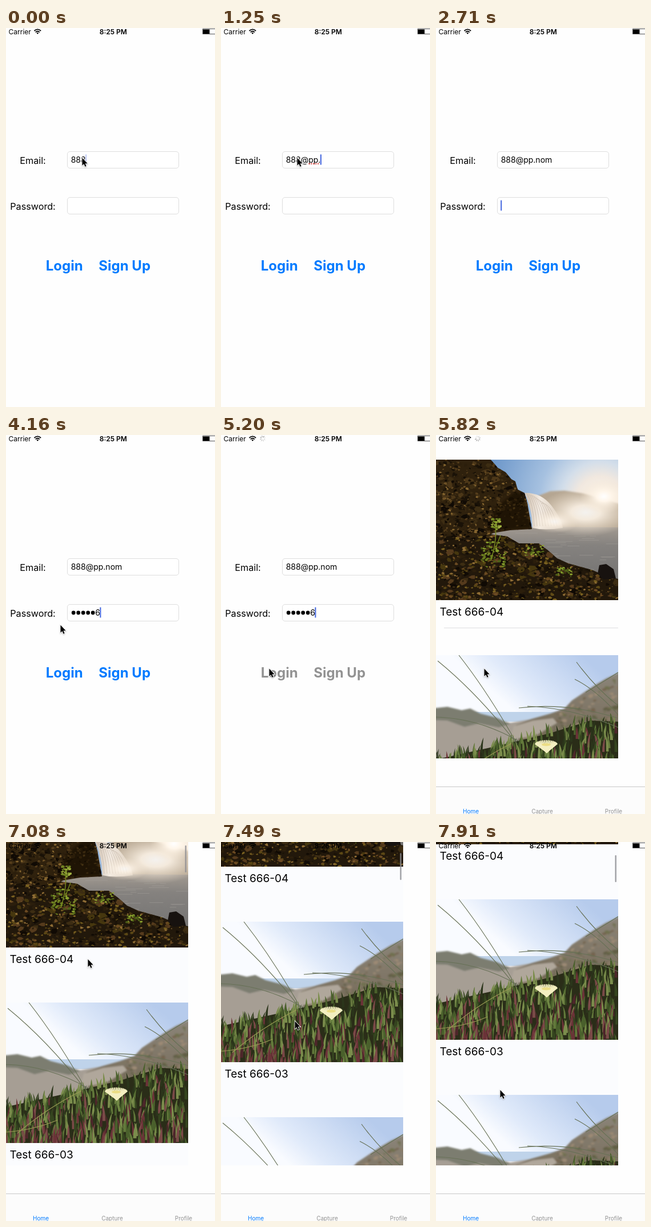
An HTML page for the animation above (8000 ms loop, 366 by 661 pixels).

```html
<!DOCTYPE html>
<html lang="en">
<head>
<meta charset="utf-8">
<title>Login and photo feed</title>
<style>
html, body { margin: 0; height: 100%; overflow: hidden; background: #fefefe; }
svg { display: block; width: 100vw; height: 100vh; font-family: Inter, Roboto, sans-serif; }
.mid { text-anchor: middle; }
.label { font-size: 16.2px; }
.input { font-size: 14px; }
.box { fill: #fff; stroke: #dedede; }
.button { font-size: 24px; font-weight: 700; }
.title { font-size: 19px; }
.tab { font-size: 10px; fill: #929292; }
.caret { fill: #4366df; }
#mouse { filter: drop-shadow(0 1px 1px #0004); }
</style>
</head>
<body>
<svg viewBox="0 0 366 661" preserveAspectRatio="none">
  <defs>
    <radialGradient id="sky1" gradientUnits="userSpaceOnUse" cx="288" cy="72" r="215">
      <stop stop-color="#fff8ee"/><stop offset=".2" stop-color="#f1e8df"/><stop offset=".32" stop-color="#d3deea"/>
      <stop offset=".5" stop-color="#a6c1e0"/><stop offset="1" stop-color="#6390c6"/>
    </radialGradient>
    <linearGradient id="water" x2="0" y2="1">
      <stop stop-color="#a29a91"/><stop offset=".25" stop-color="#85827f"/><stop offset="1" stop-color="#6b6b6b"/>
    </linearGradient>
    <linearGradient id="fall" x2="1" y2="0">
      <stop stop-color="#cfc0b0"/><stop offset=".4" stop-color="#f3ebe2"/><stop offset="1" stop-color="#e9dccd" stop-opacity=".6"/>
    </linearGradient>
    <radialGradient id="sun">
      <stop stop-color="#fff"/><stop offset=".3" stop-color="#fff6ea"/><stop offset="1" stop-color="#f3e4d0" stop-opacity="0"/>
    </radialGradient>
    <linearGradient id="sky2" x1=".32" y1=".42" x2=".8" y2="0">
      <stop offset=".15" stop-color="#f9fbff"/><stop offset=".4" stop-color="#e0eafa"/><stop offset="1" stop-color="#b6cbec"/>
    </linearGradient>
    <linearGradient id="hill" x2="0" y2="1">
      <stop stop-color="#8b8579"/><stop offset=".5" stop-color="#7d7363"/><stop offset="1" stop-color="#5e5a40"/>
    </linearGradient>
    <filter id="soft"><feGaussianBlur stdDeviation="1.8"/></filter>
    <clipPath id="frame"><path d="M0 0H319V245H0Z"/></clipPath>
    <clipPath id="cliffClip"><path id="cliffShape" d="M0 0H96L108 14 122 22 132 34 139 38 143 52 155 58 160 76 168 121 130 123 100 128 60 150 0 150Z"/></clipPath>
    <clipPath id="shoreClip"><path id="shoreShape" d="M0 138 30 132 60 137 95 130 125 134 145 146 180 146 196 158 212 172 232 181 250 186 275 193 300 204 319 208V245H0Z"/></clipPath>
    <clipPath id="listClip"><path d="M0 0H319V564H0Z"/></clipPath>

    <g id="fallsPhoto" clip-path="url(#frame)">
      <path fill="url(#sky1)" d="M0 0H319V245H0Z"/>
      <path fill="#b5a692" filter="url(#soft)" d="M176 64 200 55 225 54 258 59 325 78V120H176Z"/>
      <path fill="url(#water)" d="M90 122 200 117 319 118V245H90Z"/>
      <ellipse cx="262" cy="92" rx="85" ry="42" fill="url(#sun)" opacity=".85"/>
      <ellipse cx="294" cy="64" rx="42" ry="30" fill="url(#sun)"/>
      <use href="#cliffShape" fill="#2f210d"/>
      <g id="cliff" clip-path="url(#cliffClip)"></g>
      <path fill="#130d06" opacity=".6" filter="url(#soft)" d="M104 84 138 56 154 62 166 119 90 124Z"/>
      <path fill="url(#fall)" d="M155 58Q184 57 202 80T222 119Q190 124 169 119 168 84 155 58Z"/>
      <g id="streams" fill="none" stroke="#b5a697" opacity=".5"></g>
      <ellipse cx="208" cy="108" rx="42" ry="20" fill="url(#sun)" opacity=".75"/>
      <g id="ripples" stroke="#a5a19b" opacity=".5"></g>
      <use href="#shoreShape" fill="#22180b"/>
      <g id="shore" clip-path="url(#shoreClip)"></g>
      <path fill="#17120f" d="M283 199 286 184 298 182 311 191 315 207 293 209Z"/>
      <g id="plants"></g>
      <path stroke="#75861f" stroke-width="1.5" fill="none" d="M104 117Q107 140 96 176M113 132 104 155"/>
    </g>

    <g id="dunePhoto" clip-path="url(#frame)">
      <path fill="url(#sky2)" d="M0 0H319V245H0Z"/>
      <path fill="#bfd3ea" d="M60 99H210V116H60Z"/>
      <g filter="url(#soft)">
        <path fill="#a69e94" d="M-9 106 60 102 130 118 210 104V200H-9Z"/>
        <path fill="#7b7d70" d="M-9 93 20 90 45 96 60 93 78 102 106 109 130 120 110 126 75 119 50 125 20 114-9 113Z"/>
        <path fill="url(#hill)" d="M328 27 297 41 280 51 256 67 238 79 225 93 200 102 168 111 140 122 150 190H328Z"/>
        <g id="scrub"></g>
        <path fill="#b0a79b" d="M136 124 170 114 205 110 212 118 175 140 130 148Z"/>
      </g>
      <path fill="#2a2d18" d="M0 182 100 160 200 136 270 114 319 116V245H0Z"/>
      <g id="leaves"></g>
      <g fill="none" stroke="#667055" stroke-width="1.1">
        <path d="M3 10Q72 66 138 150M40 0Q92 66 142 155M0 108Q75 110 145 150M145 92Q230 82 319 110M160 89Q240 92 319 126M246 12Q280 58 319 88M243 42Q280 60 319 104M262 65 319 30"/>
        <path stroke="#9c9a55" d="M20 228Q70 185 132 154M0 226Q50 222 90 205"/>
      </g>
      <path stroke="#6f8744" stroke-width="4" d="M194 169 199 190"/>
      <g id="flower" stroke="#f4efc1" stroke-width="2.4" stroke-linecap="round"></g>
      <ellipse cx="193" cy="156" rx="8" ry="2.5" fill="#ebdd85"/>
    </g>
  </defs>

  <path fill="#fefefe" d="M0 0H366V661H0Z"/>

  <g id="login">
    <text class="label mid" x="47" y="236.5">Email:</text>
    <text class="label mid" x="47" y="316.5">Password:</text>
    <rect class="box" x="107.5" y="215.5" width="195" height="29" rx="4.5"/>
    <rect class="box" x="107.5" y="295.5" width="195" height="29" rx="4.5"/>
    <text class="input" id="email" x="113.7" y="235"></text>
    <path id="typo" d="M154.5 236.8H171" stroke="#e2504c" stroke-width="2.4" stroke-linecap="round" stroke-dasharray="0 3.9"/>
    <g id="dots"></g>
    <text class="input" id="digit" y="315">6</text>
    <rect class="caret" id="caret" width="2" height="18"/>
    <g id="buttons">
      <text class="button mid" id="loginButton" x="102.2" y="423">Login</text>
      <text class="button mid" x="207.7" y="423">Sign Up</text>
    </g>
  </g>

  <g id="home">
    <path fill="#fefefe" d="M0 0H366V661H0Z"/>
    <g clip-path="url(#listClip)">
      <path id="tint" fill="#fbfcfe" d="M0 0H319V564H0Z"/>
      <g id="list"></g>
      <rect id="thumb" x="313.5" width="2.5" height="47" rx="1.2" fill="#8d8d92" opacity=".8"/>
    </g>
    <path fill="#fcfcfc" d="M0 613H366V661H0Z"/>
    <path stroke="#c9c9c9" d="M0 613.5H366"/>
    <text class="tab mid" x="61" y="659.7" style="fill:#007aff">Home</text>
    <text class="tab mid" x="186" y="659.7">Capture</text>
    <text class="tab mid" x="311" y="659.7">Profile</text>
  </g>

  <g id="status">
    <text x="4.6" y="10.7" font-size="12">Carrier</text>
    <path fill="none" stroke="#000" stroke-width="1.7" d="M49.5 5Q55.3 -.2 61.1 5M51.7 7.3Q55.3 4.2 58.9 7.3"/>
    <path d="M53.3 8.7Q55.3 7.3 57.3 8.7L55.3 10.8Z"/>
    <g id="spinner" stroke="#777" stroke-width="1.1"></g>
    <text class="mid" x="187.8" y="10.7" font-size="12" font-weight="600">8:25 PM</text>
    <path fill="#fff" stroke="#555" d="M370 1.5H344.5V10.5H370"/>
    <path d="M345 2.5H356.5V10H345Z"/>
  </g>

  <path id="mouse" d="M.5 .5V13.8L3.5 11 5.5 15.8 7.6 14.9 5.6 10.2H9.7Z" stroke="#fff" stroke-width="1.6" paint-order="stroke"/>
</svg>
<script>
const $ = id => document.getElementById(id);
const show = (id, on) => $(id).style.display = on ? '' : 'none';
const move = (id, x, y) => $(id).setAttribute('transform', `translate(${x} ${y})`);

let seed = 41;
const rnd = (lo, hi) => lo + (hi - lo) * ((seed = seed * 16807 % 2147483647) / 2147483647);
const pick = list => list[Math.floor(rnd(0, list.length))];
const fill = (id, n, part) => $(id).innerHTML += Array.from({ length: n }, (_, i) => part(i)).join('');

// Irregular stone or tuft
function blob(x, y, r, color) {
  let d = '';
  for (let a = 0; a < 6; a++) {
    const q = r * rnd(.4, 1.3);
    d += `${a ? 'L' : 'M'}${(x + q * Math.cos(a * 1.05)).toFixed(1)} ${(y + q * .7 * Math.sin(a * 1.05)).toFixed(1)}`;
  }
  return `<path fill="${color}" d="${d}Z"/>`;
}
const scatter = (id, n, [x, y, w, h], [small, big], colors) =>
  fill(id, n, () => blob(rnd(x, x + w), rnd(y, y + h), rnd(small, big), pick(colors)));

const dark = ['#1a1207', '#100a04', '#2b1e0c', '#3d2d13'];
const greens = ['#6c8020', '#8aa02e', '#4c5d17'];
scatter('cliff', 220, [0, 0, 168, 145], [3, 8], [...dark, '#4c3718']);
scatter('cliff', 650, [0, 0, 168, 145], [1, 3.5], [...dark, '#553d1b', '#6e5126', '#85652f']);
scatter('shore', 240, [0, 132, 319, 113], [4, 9], [...dark, '#46370f', '#563b1d']);
scatter('shore', 800, [0, 132, 319, 113], [1, 4], [...dark, '#5c4815', '#6b4a22', '#7a6120', '#8f6d35']);
scatter('plants', 30, [97, 103, 17, 18], [1.5, 3.5], ['#8da232', '#6f8422', '#a5b544']);
scatter('plants', 70, [80, 142, 42, 45], [1.5, 3.5], greens);
scatter('plants', 30, [156, 150, 32, 17], [1.5, 3.5], greens);
scatter('plants', 30, [211, 188, 28, 16], [1.5, 3.5], greens);
fill('streams', 9, i => `<path d="M${160 + i * 3} ${60 + i * i * .25}Q${170 + i * 4} 75 ${172 + i * 5} 116"/>`);
fill('ripples', 34, () => `<path d="M${rnd(130, 300)} ${rnd(126, 195)}h${rnd(10, 40)}"/>`);

fill('scrub', 260, () => {
  const x = rnd(150, 322);
  return blob(x, rnd(130 - .62 * (x - 150) + 12, 165), rnd(2, 6), pick(['#70714f', '#8a7c68', '#9c8a74', '#615f45', '#75654f']));
});
fill('leaves', 620, i => {
  const near = i / 620, x = rnd(-5, 324), top = 188 - .24 * x, y = top + (272 - top) * near;
  const h = rnd(14, 28) + near * 10, w = rnd(1.3, 2.7) + near * .5, lean = rnd(-5, 6), mid = y - h * .6;
  const red = rnd(0, 1) < near * .45 + (x < 150 ? .08 : 0);
  const color = pick(red ? ['#6b3338', '#4d262a', '#7b4a48'] : ['#4a602c', '#63793b', '#35451f', '#7b8d4c', '#2b351b']);
  return `<path fill="${color}" d="M${x - w} ${y}Q${x - w} ${mid} ${x + lean} ${y - h}Q${x + w} ${mid} ${x + w} ${y}Z"/>`;
});
fill('flower', 17, i => {
  const a = Math.PI * (1.06 + i * .055);
  return `<path d="M194 169L${193 + 19 * Math.cos(a)} ${156 + 7 * Math.sin(a)}"/>`;
});

fill('list', 3, i => `<g transform="translate(0 ${43 + 341 * i})">
  <use href="#${i ? 'dunePhoto' : 'fallsPhoto'}"/>
  <text class="title" x="6.5" y="272">Test 666-0${4 - i}</text>
  <path class="rule" stroke="#dedee0" d="M14 293.5H319"/></g>`);
fill('dots', 5, i => `<circle cx="${118.2 + 8.5 * i}" cy="310" r="3.4"/>`);
fill('spinner', 8, i => `<path d="M0 -2.3V-5" opacity="${.2 + i * .1}" transform="rotate(${i * 45})"/>`);

// Tracks: [step, values...]
const mousePath = [[20, 95, 331], [22, 84, 400], [23, 84, 407], [30, 84, 407], [31, 130, 400],
  [32, 147, 312], [34, 143, 204], [35, 143, 204], [37, 115, 420], [38, 112, 432]];
const scrollPath = [[31, 0], [32, 4], [34, 104], [35, 190], [36, 245], [37, 273], [38, 284]];
function at(track, k) {
  const i = track.findIndex(p => p[0] >= k);
  if (i < 1) return track.at(i).slice(1);
  const a = track[i - 1], b = track[i], u = (k - a[0]) / (b[0] - a[0]);
  return a.slice(1).map((v, j) => v + (b[j + 1] - v) * u);
}

const LOOP = 8000, STEP = 1250 / 6, address = '888@pp.nom';

function draw(k) {
  const inEmail = k < 9;
  $('email').textContent = address.slice(0, [3, 3, 4, 4, 4, 6, 7, 8][k] ?? 10);
  show('typo', k === 6 || k === 7);

  const typed = k < 12 ? 0 : [0, 0, 1, 2, 3, 4][k - 12] ?? 6;
  const hidden = Math.max(0, typed - 1);
  [...$('dots').children].forEach((dot, i) => dot.style.display = i < hidden ? '' : 'none');
  show('digit', typed > 0);
  $('digit').setAttribute('x', 113.7 + 8.5 * hidden);

  const width = inEmail ? $('email').getComputedTextLength() : 8.5 * hidden + (typed ? 8.7 : 0);
  move('caret', 113.2 + width, inEmail ? 220.5 : 300.5);
  $('caret').style.opacity = k === 0 ? .35 : k === 1 || k === 12 ? 0 : 1;

  $('buttons').setAttribute('fill', k >= 25 ? '#929292' : '#007aff');
  $('loginButton').style.opacity = k === 23 ? .25 : 1;

  const [scroll] = at(scrollPath, k);
  show('login', k < 26);
  show('home', k >= 26);
  move('home', 0, k === 26 ? 32 : 0);
  move('list', 0, -scroll);
  show('tint', k >= 32);
  show('thumb', k >= 32);
  $('thumb').setAttribute('y', -4 + scroll * .095);
  document.querySelectorAll('.rule').forEach(r => r.style.display = k < 32 ? '' : 'none');

  show('spinner', k >= 24 && k < 29);
  $('spinner').setAttribute('transform', `translate(73 6.2) rotate(${k * 75})`);

  show('mouse', inEmail || k >= 20);
  move('mouse', ...(inEmail ? [133, 226] : at(mousePath, k)));
}

// The screen refreshes in coarse steps, about five per second
let last = -1;
function tick() {
  const k = Math.min(38, Math.floor((performance.now() % LOOP + 20) / STEP));
  if (k !== last) draw(last = k);
  requestAnimationFrame(tick);
}
tick();
</script>
</body>
</html>
```
